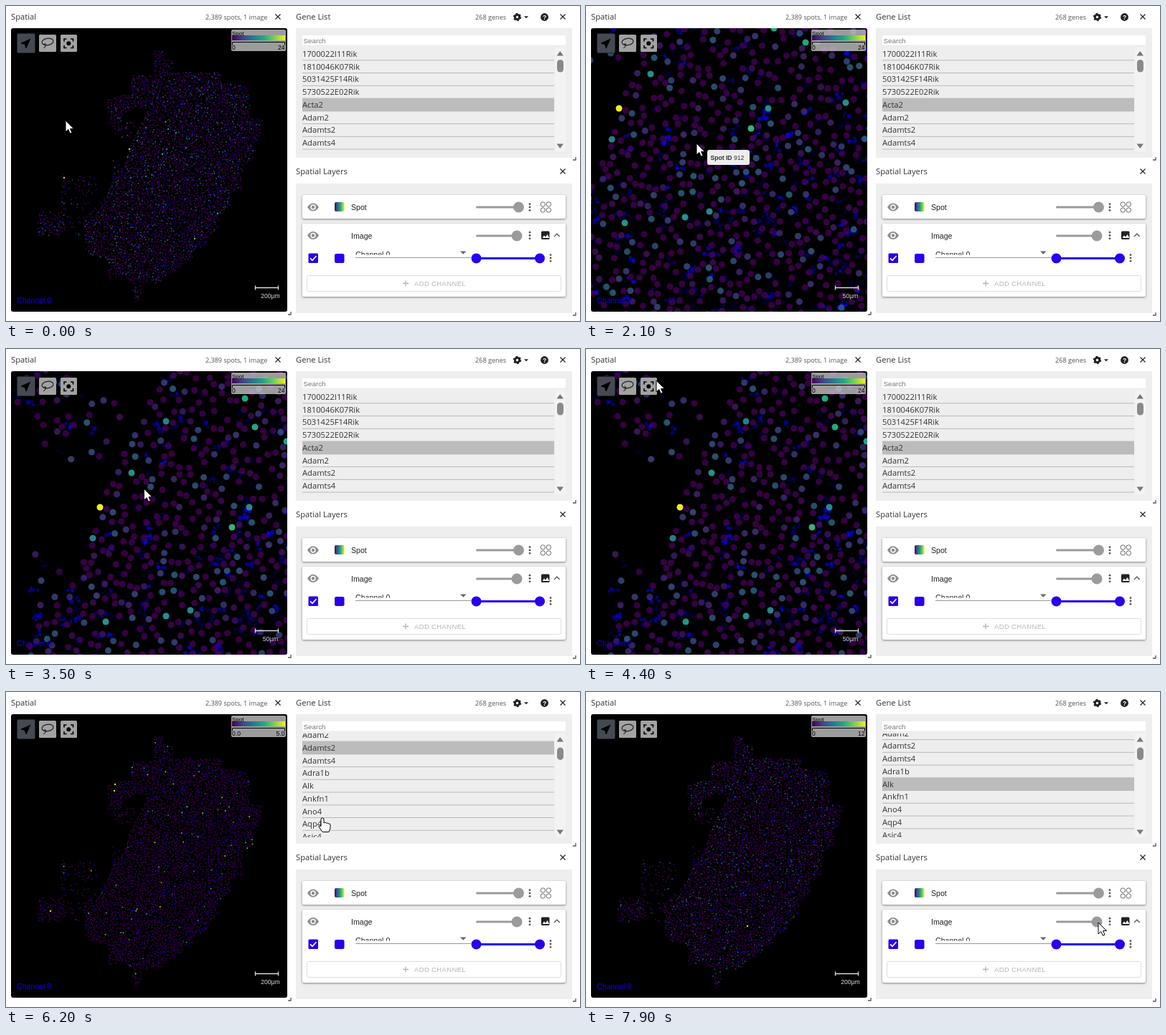
Write an HTML page with a canvas that moves like this. It is 800 px wide and 440 px high and loops after 8 s.

```html
<!DOCTYPE html>
<html lang="en">
<head>
<meta charset="utf-8">
<title>Spatial gene viewer</title>
<style>
  html, body { margin: 0; width: 800px; height: 440px; overflow: hidden; background: #fff; }
  canvas, svg { position: absolute; left: 0; top: 0; }
  canvas { left: 7px; top: 31px; border-radius: 3px; background: #000; }
  text { font: 11.2px "Open Sans", "Noto Sans", sans-serif; fill: #333; }
  .info { font-size: 9.1px; fill: #555; }
  .ui { font: 10.6px "Liberation Sans", Arial, sans-serif; fill: #222; }
  .small { font: 8.6px "Liberation Sans", Arial, sans-serif; fill: #000; }
  .line { fill: none; stroke: #222; stroke-width: 1.2; }
  .panel { fill: #eee; }
  .card { fill: #fff; filter: drop-shadow(0 1px 1.5px #0007); }
</style>
</head>
<body>
<canvas id="view" width="385" height="396"></canvas>
<svg id="stage" width="800" height="440" viewBox="0 0 800 440">
  <defs>
    <linearGradient id="viridis"></linearGradient>
    <clipPath id="listClip"><rect x="413" y="58" width="352" height="145"/></clipPath>
    <clipPath id="selectClip"><rect x="485" y="338" width="160" height="9.5"/></clipPath>
    <g id="close"><path class="line" d="M-3.5-3.5L3.5 3.5M3.5-3.5L-3.5 3.5"/></g>
    <g id="grip"><path d="M-2 2H2V-2" fill="none" stroke="#555" stroke-width="1.3"/></g>
    <g id="dots" fill="#555"><circle cy="-4.3" r="1.4"/><circle r="1.4"/><circle cy="4.3" r="1.4"/></g>
    <g id="eye">
      <path d="M-8 0Q-4.5-5.5 0-5.5T8 0Q4.5 5.5 0 5.5T-8 0Z" fill="#8c8c8c"/>
      <circle r="3.7" fill="#fff"/><circle r="2.2" fill="#8c8c8c"/>
    </g>
  </defs>

  <text x="7" y="18.5">Spatial</text>
  <text x="278" y="18.5" class="info">2,389 spots, 1 image</text>
  <text x="404" y="18.5">Gene List</text>
  <text x="654" y="18.5" class="info">268 genes</text>
  <text x="404" y="235">Spatial Layers</text>
  <use href="#close" x="379" y="15"/><use href="#close" x="776" y="15"/><use href="#close" x="776" y="231"/>
  <use href="#grip" x="395" y="429"/><use href="#grip" x="792" y="213"/><use href="#grip" x="792" y="430"/>
  <circle cx="712.5" cy="15.5" r="3.2" fill="none" stroke="#222" stroke-width="3"/>
  <circle cx="712.5" cy="15.5" r="4.8" fill="none" stroke="#222" stroke-width="1.8" stroke-dasharray="2.5 2.53"/>
  <path d="M722 14.2h6l-3 3z" fill="#222"/>
  <circle cx="750.5" cy="15.5" r="5.4" fill="#222"/>
  <text x="750.5" y="18.8" class="small" text-anchor="middle" style="fill:#fff;font-weight:bold">?</text>

  <!-- overlays of the spatial view -->
  <text x="15" y="415" class="ui" style="fill:#1200e0">Channel 0</text>
  <path id="scaleBar" fill="none" stroke="#ddd" stroke-width="1.3"/>
  <text id="scaleText" x="368.5" y="407.5" class="small" text-anchor="middle" style="fill:#ddd"></text>
  <rect id="dim" x="7" y="31" width="385" height="396" rx="3" opacity=".55"/>
  <rect x="15.5" y="38.5" width="25" height="27" rx="2" fill="#454952" stroke="#24272d"/>
  <path d="M34.5 45.5L21 51.5V52.5L26 54L27.5 59H28.5Z"/>
  <rect x="46" y="40" width="24" height="24" rx="1.5" fill="#a2a2a2"/>
  <ellipse cx="58" cy="50" rx="8" ry="4.7" class="line" transform="rotate(-8 58 50)"/>
  <path class="line" d="M52.5 53.5q3.5-1.5 3 1.2t-3.2 4"/>
  <rect x="76" y="40" width="23" height="24" rx="1.5" fill="#a2a2a2"/>
  <path d="M81 49.5v-3.5h3.5M90 46h3.5v3.5M93.5 55v3.5h-3.5M84.5 58.5h-3.5v-3.5" fill="none" stroke="#000" stroke-width="1.6"/>
  <circle cx="87.3" cy="52.2" r="3"/>
  <rect x="314" y="33" width="76" height="30" rx="2" fill="#d0d0d0" opacity=".75"/>
  <text x="315" y="41" class="small" style="font-size:8px">Spot</text>
  <rect x="315" y="41" width="74" height="7" fill="url(#viridis)"/>
  <path d="M315.5 54.5V50.5H388.5V54.5" fill="none" stroke="#000"/>
  <text id="low" x="315" y="60.5" class="small"></text>
  <text id="high" x="388.5" y="60.5" class="small" text-anchor="end"></text>
  <g id="tooltip">
    <rect x="169" y="201" width="59" height="21" rx="3" fill="#ededed"/>
    <text x="173.5" y="215" class="small" style="fill:#333"><tspan font-weight="bold">Spot ID</tspan> 912</text>
  </g>

  <rect class="panel" x="404" y="31" width="385" height="181"/>
  <rect x="413" y="41" width="367" height="13.5" fill="#fff"/>
  <text x="414.5" y="51.5" class="ui" style="font-size:9.8px;fill:#777">Search</text>
  <g clip-path="url(#listClip)"><g id="list"></g></g>
  <rect x="765" y="58" width="15" height="145" fill="#f3f3f3"/>
  <path d="M767.5 69.5h9.5l-4.75-6.5zM767.5 192.5h9.5l-4.75 6.5z" fill="#777"/>
  <rect id="thumb" x="768" y="75" width="9" height="17.5" rx="4.5" fill="#8a8a8a"/>

  <rect class="panel" x="404" y="248" width="385" height="181"/>
  <rect class="card" x="413" y="264" width="367" height="33" rx="2"/>
  <rect class="card" x="413" y="304" width="367" height="102" rx="2"/>
  <use href="#eye" x="428" y="281"/><use href="#eye" x="428" y="320.5"/>
  <rect x="458" y="274" width="13.5" height="13" rx="2" fill="url(#viridis)"/>
  <text x="481" y="284.5" class="ui">Spot</text>
  <text x="481" y="324.5" class="ui">Image</text>
  <g fill="#9b9b9b" stroke="#9b9b9b" stroke-width="3">
    <path d="M656.5 281H714M656.5 321H711" stroke-linecap="round"/>
    <circle cx="714.5" cy="281" r="6"/><circle cx="712" cy="321" r="6"/>
  </g>
  <use href="#dots" x="730" y="281"/><use href="#dots" x="730" y="320.5"/><use href="#dots" x="759" y="352"/>
  <g fill="none" stroke="#444" stroke-width=".8">
    <circle cx="748.3" cy="277" r="3.2"/><circle cx="756.3" cy="277" r="3.2"/>
    <circle cx="748.3" cy="285" r="3.2"/><circle cx="756.3" cy="285" r="3.2"/>
  </g>
  <rect x="746" y="314.5" width="11.5" height="11.5" rx="1.5" fill="#222"/>
  <path d="M747.5 324l2.5-3.5 2 2.2 2.5-3.6 2.8 4.9z" fill="#fff"/>
  <path d="M764 322l3.8-3.8 3.8 3.8" fill="none" stroke="#555" stroke-width="1.3"/>
  <rect x="421.5" y="345.5" width="13.5" height="13.5" rx="1.5" fill="#2800ee"/>
  <path d="M424 352.3l3 3 5.5-6" fill="none" stroke="#fff" stroke-width="1.7"/>
  <rect x="458" y="346" width="13.5" height="13" rx="2.5" fill="#2800ee"/>
  <g clip-path="url(#selectClip)"><text x="487" y="351" class="ui">Channel 0</text></g>
  <path d="M487 351.5H648" stroke="#999"/>
  <path d="M633 342.5h8.5l-4.25 4.2z" fill="#666"/>
  <g fill="#2800ee" stroke="#2800ee" stroke-width="3">
    <path d="M656 352.5H744"/><circle cx="655.5" cy="352.5" r="5.5"/><circle cx="744" cy="352.5" r="5.5"/>
  </g>
  <rect x="419.5" y="376.5" width="354" height="22" rx="2" fill="none" stroke="#ddd"/>
  <path d="M553 387.5h8M557 383.5v8" stroke="#b5b5b5" stroke-width="1.3"/>
  <text x="569" y="390.5" class="ui" style="font-size:9.5px;letter-spacing:.35px;fill:#b5b5b5">ADD CHANNEL</text>

  <g id="cursor" fill="#fff" stroke="#000" stroke-linejoin="round">
    <path id="arrow" d="M0 0V16L3.8 12.5L6.3 18.2L9 17L6.6 11.5H11.5Z"/>
    <path id="point" d="M-2 1Q0-2 2 1V7Q4 5 5.5 7.3Q7 6 8.3 8Q10.5 7 11 9.5V14L9 19.5H0L-4.5 13Q-6 10-2 11.5Z"/>
    <path id="grab" d="M-5-3Q-3.5-6-2-4.5Q0-7 1.5-4.5Q3.5-6 4.5-3.5Q6.5-4 7-1.5L6 4L4 7.5H-3L-6.5 2Q-7-1-4.5 0Z"/>
  </g>
</svg>
<script>
const $ = id => document.getElementById(id);
const ctx = $("view").getContext("2d");

let seed = 912;
const rnd = () => {
  seed = (seed + 0x6D2B79F5) | 0;
  let n = Math.imul(seed ^ seed >>> 15, 1 | seed);
  n ^= n + Math.imul(n ^ n >>> 7, 61 | n);
  return ((n ^ n >>> 14) >>> 0) / 2 ** 32;
};
const spread = r => (rnd() + rnd() - 1) * r;
const clamp = v => Math.max(0, Math.min(1, v));
const ease = v => v * v * (3 - 2 * v);
const ramp = (t, a, b) => ease(clamp((t - a) / (b - a)));

// colour scale
const stops = ["#440154", "#414487", "#2a788e", "#22a884", "#7ad151", "#f2ee20"];
const rgb = stops.map(s => [1, 3, 5].map(i => parseInt(s.slice(i, i + 2), 16)));
const colour = v => {
  const i = Math.min(4, Math.floor(v * 5)), f = v * 5 - i;
  return `rgb(${rgb[i].map((c, k) => Math.round(c + (rgb[i + 1][k] - c) * f))})`;
};
$("viridis").innerHTML = stops.map((s, i) => `<stop offset="${i * 20}%" stop-color="${s}"/>`).join("");

// tissue
const tissue = new Path2D(`M206 62H218V72L232 75V93H300L303 108L333 112L340 125L342 155L357 160
  L354 185L345 190V215L330 225L328 255L315 262L312 280L297 290V315L285 318L278 335L263 340
  L258 355L232 372L212 387H188V413H178L176 384L165 378L143 382V355L112 345L108 292L125 285
  L140 262L148 245L165 222L172 200L178 185L195 150V140L165 148L160 165H142V130L174 122L176 97H206Z`);
const sparse = [[44, 288, 38, 33, .85], [76, 235, 7, 55, .5], [82, 237, 45, 50, .22],
  [150, 160, 30, 24, .4], [82, 290, 28, 30, .2], [130, 205, 30, 30, .06], [147, 228, 24, 24, .55]];
const density = (x, y) => ctx.isPointInPath(tissue, x, y) ? .95 : Math.max(0, ...sparse.map(
  ([l, t, w, h, d]) => x > l && x < l + w && y > t && y < t + h ? d : 0));

// expression profiles: share of zeros, exponent, top value
const profiles = [[.62, 1.6, .36], [.975, .7, .9], [1, 1, 0], [.72, 1.5, .34]];
const spots = [];
const addSpot = (x, y, gene, value) => {
  const colours = profiles.map(([zero, power, top], i) => {
    const r = rnd();
    return colour(i === gene ? value : r > zero ? ((r - zero) / (1 - zero)) ** power * top : 0);
  });
  spots.push({ x, y, colours, a: value ? 1 : .78 });
};
[[172, 200, 1], [81, 240, 1], [218, 207, .65], [183, 188, .5], [226, 172, .6], [222.5, 162, .6],
  [169.5, 210.8, .42], [195, 238, .5], [224, 200, .48], [174, 240, .52], [237, 177, .58],
  [195, 170, .42], [251, 198, .5], [203.5, 236, .45], [295, 290, .75], [263, 325, .85]]
  .forEach(([x, y, v]) => addSpot(x, y, 0, v));
[[151, 138], [152, 129], [62, 306]].forEach(([x, y]) => addSpot(x, y, 1, 1));
addSpot(213, 229, 2, .9);
addSpot(225, 327, 3, 1);
const step = 3.4;
for (let gy = 58; gy < 416; gy += step)
  for (let gx = 42; gx < 360; gx += step) {
    const x = gx + rnd() * step, y = gy + rnd() * step;
    if (rnd() < density(x, y) && !spots.some(s => Math.hypot(s.x - x, s.y - y) < 2.2)) addSpot(x, y);
  }

// stained specks of the blue channel, in loose clumps
const specks = [];
while (specks.length < 8000) {
  const x = 40 + rnd() * 320, y = 58 + rnd() * 358;
  if (rnd() > density(x, y) * (.5 + .5 * clamp((x - 130) / 120))) continue;
  const a = .08 + rnd() ** 2 * .5;
  for (let i = 0; i < 6; i++)
    specks.push({ x: x + spread(2), y: y + spread(1.6), r: .25 + rnd() * .5, a });
}

function drawView(z, tx, ty, gene) {
  ctx.clearRect(0, 0, 385, 396);
  const disc = (p, r) => {
    const x = p.x * z + tx - 7, y = p.y * z + ty - 31;
    if (x < -9 || y < -9 || x > 394 || y > 405) return;
    ctx.globalAlpha = p.a;
    ctx.beginPath();
    ctx.arc(x, y, r * z, 0, 7);
    ctx.fill();
  };
  ctx.fillStyle = "#1000ff";
  for (const s of specks) disc(s, s.r);
  for (const s of spots) { ctx.fillStyle = s.colours[gene]; disc(s, 1.13); }
}

// gene list
const pitch = 17.75;
const genes = ["1700022I11Rik", "1810046K07Rik", "5031425F14Rik", "5730522E02Rik", "Acta2", "Adam2",
  "Adamts2", "Adamts4", "Adra1b", "Alk", "Ankfn1", "Ano4", "Aqp4", "Asic4"];
$("list").innerHTML = `<rect id="chosen" x="413" width="351" height="${pitch}" fill="#bcbcbc"/>` +
  genes.map((g, i) => `<text x="413" y="${70.8 + i * pitch}">${g}</text>
    <path d="M413 ${75.8 + i * pitch}H764" stroke="#b8b8b8"/>`).join("");

// cursor stops: time, x, y
const path = [[0, 83, 160], [150, 83, 160], [900, 214, 219], [1750, 214, 219], [2050, 154, 192],
  [2150, 154, 192], [2550, 239, 270], [3000, 239, 270], [4300, 98, 44], [4600, 98, 44],
  [5250, 441, 176], [6250, 441, 176], [6500, 448, 134], [7150, 448, 134], [7800, 714, 322], [8000, 714, 322]];
function cursorAt(t) {
  const i = path.findIndex(p => p[0] > t), a = path[i - 1], b = path[i];
  const f = ramp(t, a[0], b[0]);
  return [a[1] + (b[1] - a[1]) * f, a[2] + (b[2] - a[2]) * f];
}

const show = (id, on) => $(id).setAttribute("visibility", on ? "visible" : "hidden");
const within = (t, a, b) => t >= a && t < b;

function frame() {
  const t = performance.now() % 8000;

  // zoom about a fixed point, then drag, then reset
  const zoomed = t < 4600;
  const level = zoomed ? 2 * ramp(t, 1000, 1750) : 0, z = 2 ** level;
  const drag = zoomed ? ramp(t, 2150, 2550) : 0;
  const stage = t < 5400 ? 0 : t < 6600 ? 1 : t < 7150 ? 2 : 3;
  drawView(z, 214 * (1 - z) + 85 * drag, 219 * (1 - z) + 78 * drag, stage);

  const unit = 200 / 2 ** Math.floor(level + .01);
  $("scaleBar").setAttribute("d", `M${379.5 - 32 * z * unit / 200} 390.5v6m0-3H379.5m0-3v6`);
  $("scaleText").textContent = unit + "µm";
  $("low").textContent = ["0", "0.0", "0.0", "0"][stage];
  $("high").textContent = ["24", "5.0", "1.0", "12"][stage];
  show("dim", within(t, 5400, 6000) || within(t, 6600, 7150));
  show("tooltip", within(t, 2050, 2150));

  const scroll = 98 * ramp(t, 6020, 6220);
  $("list").setAttribute("transform", `translate(0 ${-scroll})`);
  $("thumb").setAttribute("y", 75 + scroll * .025);
  $("chosen").setAttribute("y", 58.2 + pitch * (t < 5350 ? 4 : t < 6550 ? 6 : 9));

  const [x, y] = cursorAt(t);
  const grab = within(t, 2150, 2750), point = x > 413 && x < 764 && y > 58 && y < 203;
  $("cursor").setAttribute("transform", `translate(${x} ${y})`);
  show("grab", grab);
  show("point", point);
  show("arrow", !grab && !point);
  requestAnimationFrame(frame);
}
frame();
</script>
</body>
</html>
```
